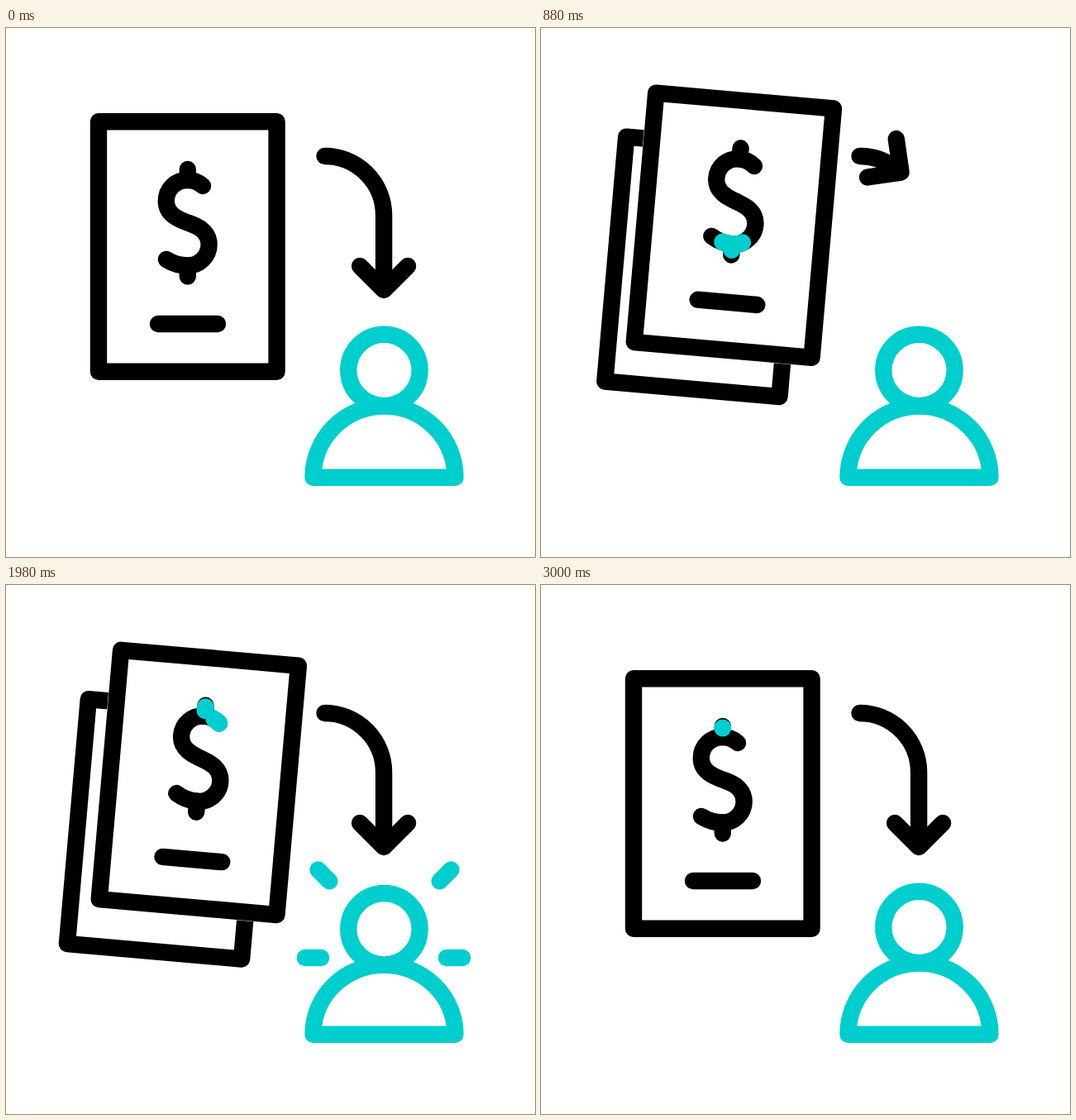
Animation of 640x640 px, one loop 3320 ms. Source, as an HTML page:

```html
<!DOCTYPE html>
<html lang="en">
<head>
<meta charset="utf-8">
<title>Payment to person</title>
<style>
  html, body { margin: 0; width: 100%; height: 100%; overflow: hidden; background: #fff; }
  svg { display: block; width: 100%; height: 100%; }
  .line { fill: none; stroke: #000; stroke-width: 20.4; stroke-linecap: round; stroke-linejoin: round; }
  .sheet { fill: #fff; }
  .teal { stroke: #00cdcd; }
  .glow { stroke: #00cdcd; stroke-width: 21; }
</style>
</head>
<body>
<svg viewBox="0 0 640 640">
  <rect id="back" class="line sheet" x="113.8" y="116" width="212" height="297"/>

  <g id="front">
    <rect x="112" y="113.3" width="215.6" height="302.5" fill="#fff" stroke="#fff" stroke-width="21.2" stroke-linejoin="round"/>
    <rect class="line" x="112" y="113.3" width="215.6" height="302.5"/>
    <path class="line" d="M184 358H256M219.8 171V184M219.8 287.5V300.5"/>
    <path id="ess" class="line"/>
    <path id="essGlow" class="line glow" pathLength="207"/>
    <path id="lowGlow" class="line glow"/>
    <path id="topGlow" class="line glow"/>
  </g>

  <path id="shaft" class="line" d="M385.5 155A71.6 71.6 0 0 1 457.1 226.6V317"/>
  <path id="head" class="line" d="M-29 -20L0 9L29 -20"/>

  <path id="body" class="line teal"/>
  <circle id="face" class="line teal" cx="457.5" r="43.2"/>
  <g id="rays"></g>
</svg>
<script>
  const LOOP = 3320, STEP = 20;
  const $ = id => document.getElementById(id);
  const clamp = (v, lo = 0, hi = 1) => Math.min(hi, Math.max(lo, v));
  const ease = (t, from, to) => {
    const p = clamp((t - from) / (to - from));
    return p * p * (3 - 2 * p);
  };
  // rises over a..b, falls over c..d
  const pulse = (t, a, b, c, d) => ease(t, a, b) - ease(t, c, d);

  const ESS = "M194 280C202 285 211 287.5 219.8 287.5C234 287.5 245.6 276 245.6 262" +
    "C245.6 244 229 239 219.8 235.5C210 232 193.8 226 193.8 209.5" +
    "C193.8 195 205 184 219.8 184C227 184 233.5 187 238 191";
  $("ess").setAttribute("d", ESS);
  $("essGlow").setAttribute("d", ESS);

  // start point and direction of each burst ray
  const RAYS = [[402, 369, -1, -1], [514, 369, 1, -1], [396, 451, -1.4, 0], [518, 451, 1.4, 0]];
  const rays = RAYS.map(() => {
    const ray = document.createElementNS("http://www.w3.org/2000/svg", "path");
    ray.setAttribute("class", "line teal");
    return $("rays").appendChild(ray);
  });

  function place(id, x, y, angle, cx = 0, cy = 0) {
    $(id).setAttribute("transform", `translate(${x} ${y}) rotate(${angle} ${cx} ${cy})`);
  }

  function sheets(t) {
    const f = pulse(t, 212, 792, 2414, 2854);
    const b = pulse(t, 292, 872, 2494, 2934);
    const fDip = pulse(t, 1157, 1580, 1580, 2000);
    const bDip = pulse(t, 1277, 1700, 1700, 2120);
    place("front", -13 * fDip, -17 * f + 25 * fDip, 5 * f, 327.6, 415.8);
    place("back", -37.3 * b - 13 * bDip, 33 * b + 25 * bDip, 5 * b, 325.8, 413);
  }

  function tick(id, y, dir, a, b) {
    const from = clamp(a * 0.55, 0, 13), to = clamp(b * 0.55, 0, 13);
    $(id).style.display = to > 0 && from < 13 ? "" : "none";
    $(id).setAttribute("d", `M219.8 ${y + dir * from}V${y + dir * to}`);
  }

  function dollar(t) {
    const a = 207 * ease(t, 626, 2156), b = 207 * ease(t, 452, 1982);
    const glow = $("essGlow").style;
    glow.display = b > 0 && a < 207 ? "" : "none";
    glow.strokeDasharray = `${Math.max(0.01, b - a)} 999`;
    glow.strokeDashoffset = -a;
    tick("lowGlow", 287.5, 1, a - 27, b - 27);
    tick("topGlow", 184, -1, a - 187, b - 187);
  }

  function arrow(t) {
    const r = 71.6, arc = r * Math.PI / 2;
    const s = 193.8 - 147.8 * pulse(t, 212, 620, 1146, 1726) - 55 * pulse(t, 2420, 2690, 2690, 2970);
    const phi = Math.min(s, arc) / r;
    const x = 385.5 + r * Math.sin(phi);
    const y = 226.6 - r * Math.cos(phi) + Math.max(0, s - arc);
    $("shaft").style.strokeDasharray = `${s} 999`;
    place("head", x, y, phi * 180 / Math.PI - 90);
  }

  function person(t) {
    const squash = 11 * pulse(t, 1620, 1780, 1780, 2060);
    $("face").setAttribute("cy", 414 + squash);
    $("body").setAttribute("d", `M371.5 543.7A86 ${86.2 - squash} 0 0 1 543.5 543.7Z`);

    const lead = 27 * ease(t, 1640, 2060), tail = 27 * ease(t, 1800, 2220);
    $("rays").setAttribute("opacity", clamp((t - 1640) / 75) * clamp((2240 - t) / 120));
    rays.forEach((ray, i) => {
      const [x, y, dx, dy] = RAYS[i];
      ray.setAttribute("d", `M${x + dx * tail} ${y + dy * tail}L${x + dx * lead} ${y + dy * lead}`);
    });
  }

  const start = performance.now();
  function draw() {
    const t = Math.floor(((performance.now() - start) % LOOP) / STEP) * STEP;
    sheets(t);
    dollar(t);
    arrow(t);
    person(t);
    requestAnimationFrame(draw);
  }
  draw();
</script>
</body>
</html>
```
